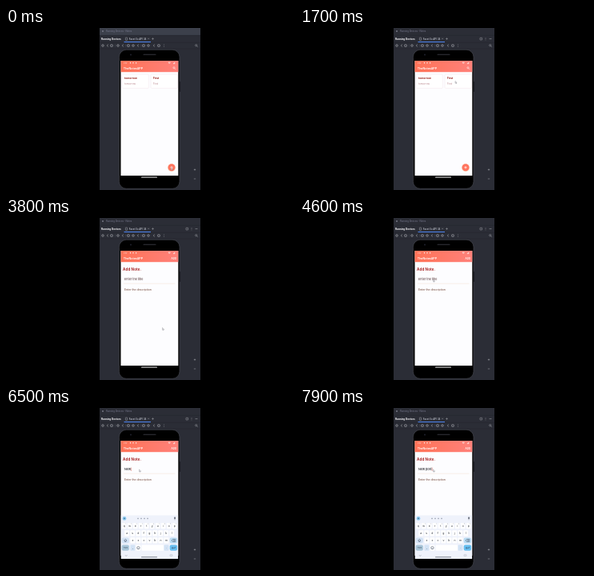
An HTML page that plays this animation: 360 by 203 pixels, repeating every 8000 ms.

```html
<!DOCTYPE html>
<html lang="en">
<head>
<meta charset="utf-8">
<title>Notes app demo</title>
<style>
html, body { margin: 0; width: 100%; height: 100%; overflow: hidden; background: #000; }
svg { display: block; width: 100%; height: 100%; font-family: Inter, Roboto, sans-serif; }
text { white-space: pre; }
</style>
</head>
<body>
<svg id="stage" viewBox="0 0 360 203"></svg>
<script>
const rect = (x, y, w, h, fill, r = 0, more = '') =>
  `<rect x="${x}" y="${y}" width="${w}" height="${h}" rx="${r}" fill="${fill}" ${more}/>`;
const dot = (x, y, r, fill, more = '') => `<circle cx="${x}" cy="${y}" r="${r}" fill="${fill}" ${more}/>`;
const label = (x, y, size, fill, str, more = '') =>
  `<text x="${x}" y="${y}" font-size="${size}" fill="${fill}" ${more}>${str}</text>`;
const line = (d, color, w = .6) => `<path d="${d}" fill="none" stroke="${color}" stroke-width="${w}"/>`;
const group = (id, body) => `<g id="${id}">${body}</g>`;
const bold = 'font-weight="700"', mid = 'text-anchor="middle"', ide = 'font-family="Roboto, sans-serif"';
const search = (x, y, c) => dot(x, y, 1.1, 'none', `stroke="${c}" stroke-width=".5"`) +
  line(`M${x + .8} ${y + .8}l1.3 1.3`, c, .5);

function windowChrome() {
  const grey = '#a9abb0';
  let s = rect(117, 0, 126, 203, '#2b2d36') + rect(117, 0, 126, 9, '#2b2d36', 0, 'id="bar"') +
    line('M117 9.2H243M117 18.3H243M117 26H243', '#20212a', .4) +
    dot(121, 4, 1, '#777987') +
    label(125, 5.2, 3, '#73758a', 'Running Devices - Notes', ide) +
    label(119, 14.8, 3.3, '#f1f1f4', 'Running Devices', ide + ' ' + bold) +
    rect(149.4, 12, 2.2, 3.4, 'none', .4, `stroke="${grey}" stroke-width=".5"`) +
    label(153.8, 14.8, 3.1, '#d4d6df', 'Facet 5c API 34', ide) +
    line('M177.3 12.6l1.6 1.6m0-1.6l-1.6 1.6M182 13.5h3M183.5 12v3', grey, .4) +
    rect(147.5, 17, 33.5, 1, '#4f86f2');
  [121, 127, 132, 140, 146, 153, 159, 165, 172, 178, 185, 191].forEach((x, i) => {
    const kind = i % 3;
    s += kind == 0 ? dot(x, 22, 1.3, 'none', `stroke="${grey}" stroke-width=".6"`)
      : kind == 1 ? line(`M${x + .8} 20.6l-1.6 1.4l1.6 1.4`, grey)
      : rect(x - 1.3, 20.8, 2.6, 2.5, 'none', .3, `stroke="${grey}" stroke-width=".6"`);
  });
  s += line('M136.4 20.5v3M149.6 20.5v3M168.8 20.5v3', '#565867', .4);
  s += [20.8, 22, 23.2].map(y => dot(197.5, y, .35, grey)).join('') + search(237.7, 21.7, grey);
  s += line('M234.8 177.5h2.4M236 176.3v2.4M234.8 189h2.4', grey, .5);
  return s + group('tools', rect(225, 12.3, 2.6, 2.6, 'none', .3, `stroke="${grey}" stroke-width=".5"`) +
    [12.3, 13.6, 14.9].map(y => dot(232, y, .35, grey)).join('') + line('M236.5 13.6h3', grey, .5));
}

function phone() {
  return rect(141.4, 27.3, 75.6, 174, '#000', 9, 'stroke="#4b4c55" stroke-width=".6"') +
    rect(217.2, 67, .7, 13, '#111118', .3) +
    dot(156, 33.4, 1, '#20222e') + rect(171.5, 32.7, 16, 1.1, '#34353d', .5) +
    rect(143.5, 41, 71.8, 144, '#fdfdff') +
    rect(143.5, 41, 71.8, 14.2, 'url(#coral)') +
    label(147, 44.7, 2.5, '#fff', '7:17') + dot(155.5, 43.8, .7, '#fff') + dot(159, 43.8, .7, '#fff') +
    rect(162, 43.2, 1.2, 1.2, '#fff') +
    line('M203 43.2l1.2 1.3l1.2-1.3z', '#fff', .6) + line('M209.2 44.7l1.6-1.7v1.7z', '#fff', .6) +
    label(146.8, 51.9, 3.6, '#fff', 'TheNotesAPP', 'font-weight="600"') +
    rect(169, 186.5, 20, 1, '#f4f4f4', .5);
}

function card(x, name) {
  return rect(x, 58, 33.4, 17.6, '#fff', 1.5, 'stroke="#f5e7ef" stroke-width=".6"') +
    label(x + 3, 64, 3.35, '#98251f', name, bold) + label(x + 3, 70.7, 3.1, '#b9868d', name);
}

function listPage() {
  return search(210, 49.8, '#fff') + card(145, 'tomorrow') + card(181, 'First') +
    dot(207, 175.2, 4.9, '#f7e3cf') + dot(207, 174.8, 4.5, '#ff755f') +
    line('M205.4 174.8h3.2M207 173.2v3.2', '#fff', .7);
}

function addPage() {
  return label(206.6, 51.7, 3, '#fff', 'ADD', 'font-weight="600"') +
    label(146, 66.2, 4.5, '#a62222', 'Add Note.', bold + ' letter-spacing=".15"') +
    label(148, 78.1, 3.7, '#64484a', '', 'id="title" font-weight="500"') +
    rect(0, 74.6, .4, 4.4, '#d44a3c', 0, 'id="caret"') +
    line('M147 82.2H211.5', '#f3dcd0', .5) +
    label(148, 90.9, 3.4, '#805a4c', 'Enter the description', 'font-weight="500"');
}

function keyboard() {
  const key = (x, y, c, fill = '#fff') => rect(x - 2.9, y - 3.7, 5.8, 7.2, fill, 1) +
    label(x, y + 1.1, 3.4, '#292e38', c, mid);
  const row = (letters, x, y) => [...letters].map((c, i) => key(x + i * 7, y, c)).join('');
  const pill = (x, y, w, fill, body) => rect(x, y - 3.6, w, 7.2, fill, 2) + body;
  const dark = '#303d52';
  return rect(143.5, 134.5, 71.8, 54.5, '#eff2fb') +
    dot(148, 138.4, 2.4, '#8dccf3') + line('M147 138.4h2M148 137.4v2', '#31506b', .5) +
    [165, 169, 173, 177].map(x => rect(x - .7, 137.7, 1.4, 1.5, '#9298aa', .4)).join('') +
    rect(210.4, 136.5, 1.3, 2.6, '#333b4a', .6) + line('M211 139v1.4', '#333b4a', .4) +
    row('qwertyuiop', 147.7, 147.8) +
    [...'1234567890'].map((c, i) => label(149.6 + i * 7, 145.8, 1.4, '#888d9a', c, mid)).join('') +
    row('asdfghjkl', 151.2, 157) + row('zxcvbnm', 158.4, 166) +
    pill(144.7, 166, 9.2, '#d3e3f5', line('M149.3 164.3l-1.7 1.8h1v1.4h1.4v-1.4h1z', dark, .45)) +
    pill(204.7, 166, 9.4, '#b9dcf3', line('M207 166l1.5-1.6h3.2v3.2h-3.2zM209.2 165.2l1.5 1.6m0-1.6l-1.5 1.6', dark, .45)) +
    pill(144.7, 175.2, 9.2, '#a9c6d9', label(149.3, 176.1, 2.5, dark, '?123', mid)) +
    key(158.4, 175.2, ',', '#d3e3f5') + rect(162.5, 171.5, 5.8, 7.2, '#fff', 1) +
    dot(165.4, 175.2, 1.7, 'none', `stroke="${dark}" stroke-width=".5"`) +
    line('M164.5 175.6q.9 1 1.8 0', dark, .4) +
    rect(169.5, 171.6, 27.5, 7.2, '#fff', 1) + key(200.5, 175.2, '.', '#d3e3f5') +
    pill(204.7, 175.2, 9.4, '#67bff0', line('M211.4 173.8v1.6h-4m1.2-1.2l-1.2 1.2l1.2 1.2', dark, .5)) +
    line('M149 184.3l1.2 1.2l1.2-1.2', '#6e7481', .5) +
    rect(205, 183.7, 3, 1.8, 'none', .3, 'stroke="#9ba0ad" stroke-width=".4"') +
    rect(169, 186.4, 20, .9, '#555a64', .4);
}

const stage = document.getElementById('stage');
stage.innerHTML = `<defs><linearGradient id="coral"><stop stop-color="#ff7358"/><stop offset="1" stop-color="#ff817a"/></linearGradient>
  <clipPath id="screen"><rect x="143.5" y="41" width="71.8" height="148"/></clipPath></defs>` +
  windowChrome() + phone() + group('list', listPage()) + group('add', addPage()) +
  `<g clip-path="url(#screen)">${group('keys', keyboard())}</g>` +
  group('pointer', '<path d="M0 0v2.8l.7-.6l.4 1.1l.6-.3l-.5-1h.9z" fill="#fff" stroke="#55575f" stroke-width=".3"/>');

const el = Object.fromEntries(['bar', 'tools', 'list', 'add', 'keys', 'title', 'caret', 'pointer']
  .map(id => [id, document.getElementById(id)]));
const show = (node, on) => node.style.display = on ? '' : 'none';
const ease = p => p * p * (3 - 2 * p);

// Pointer stops: time, x, y
const path = [[0, 206.5, 175], [500, 206.5, 175], [1500, 194, 66.5], [1800, 194, 66.5],
  [2400, 210, 50.5], [2600, 210, 50.5], [3200, 206.5, 174], [3500, 206.5, 174],
  [3800, 195.5, 137.5], [4500, 166.5, 77], [8000, 166.5, 77]];
const keyTimes = [5900, 6100, 6300, 6750, 7000, 7200, 7400, 7600];
const focusAt = 900, pageAt = 3500, keysAt = 4650;

function pointerAt(t) {
  const i = path.findIndex(p => p[0] > t), [t0, x0, y0] = path[i - 1], [t1, x1, y1] = path[i];
  const p = ease((t - t0) / (t1 - t0));
  return [x0 + (x1 - x0) * p, y0 + (y1 - y0) * p];
}

function draw(now) {
  const t = now % 8000, adding = t >= pageAt, focused = t >= focusAt;
  show(el.tools, focused);
  el.bar.setAttribute('fill', focused ? '#2b2d36' : '#3c404b');
  show(el.list, !adding);
  show(el.add, adding);
  show(el.keys, t >= keysAt);
  const rise = ease(Math.min(1, Math.max(0, (t - keysAt) / 250)));
  el.keys.setAttribute('transform', `translate(0 ${55 * (1 - rise)})`);

  const typed = 'New post'.slice(0, keyTimes.filter(k => k <= t).length);
  el.title.textContent = typed || 'Enter the title';
  el.title.setAttribute('fill', typed ? '#202025' : '#64484a');
  show(el.caret, t >= keysAt && (typed || t % 1000 >= 500));
  el.caret.setAttribute('x', 148.2 + (typed && adding ? el.title.getComputedTextLength() : 0));
  el.pointer.setAttribute('transform', `translate(${pointerAt(t)})`);
  requestAnimationFrame(draw);
}
requestAnimationFrame(draw);
</script>
</body>
</html>
```
